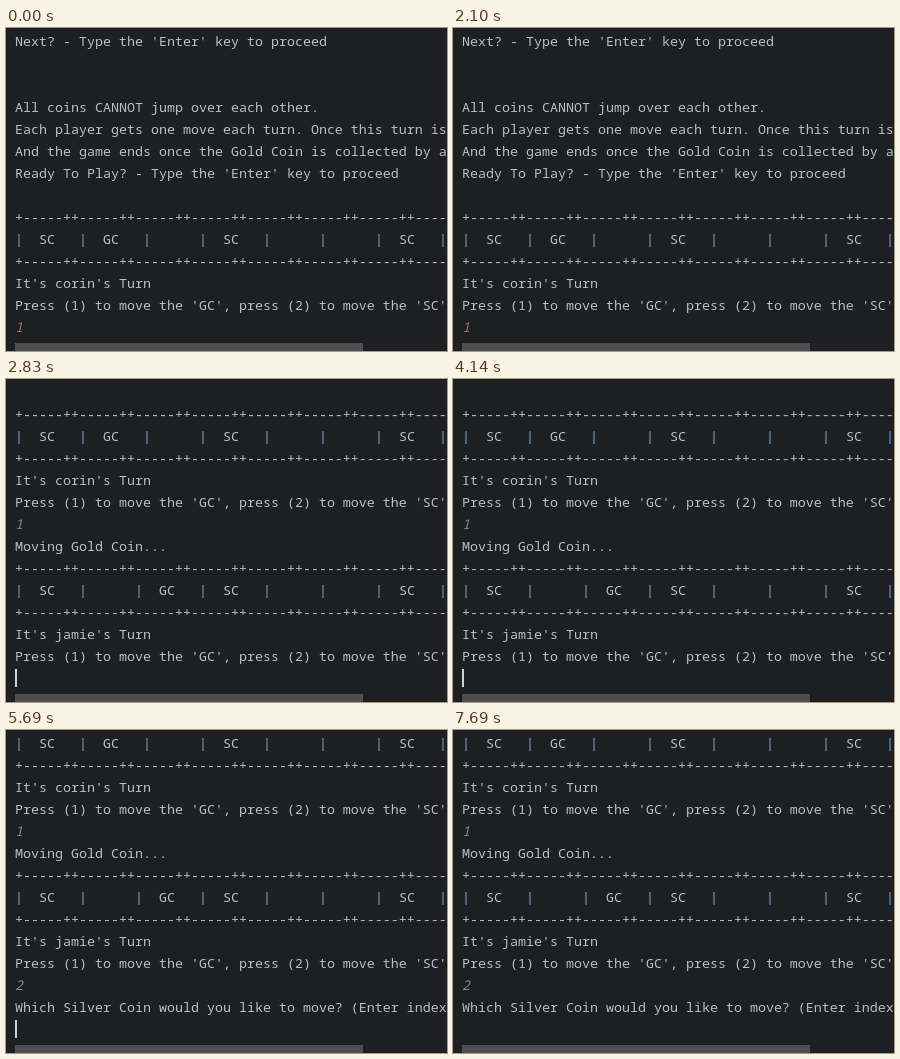
Recreate the animation shown at these times as an HTML page. Size 441x323 px, loop 8 s.

```html
<!DOCTYPE html>
<html lang="en">
<head>
<meta charset="utf-8">
<title>Coin game console</title>
<style>
  html, body { margin: 0; width: 100%; height: 100%; overflow: hidden; background: #1e1f22; }
  #stage { position: relative; width: 441px; height: 323px; overflow: hidden; }
  #log {
    position: absolute; left: 9px; top: 2px; margin: 0;
    font: 13.333px/22px "Noto Sans Mono", "DejaVu Sans Mono", monospace;
    font-variant-ligatures: none; color: #b4c0ca;
  }
  #log b { font-weight: 400; color: #78addd; }
  #log i { color: var(--typed); }
  #bar { position: absolute; left: 9px; top: 315px; width: 348px; height: 8px; background: #4d4e50; }
  #caret { position: absolute; top: 290px; width: 2px; height: 18px; background: #ced0d6; }
  #beam { position: absolute; left: -4px; top: -8px; fill: none; stroke: #d8d8d8; }
</style>
</head>
<body>
<div id="stage">
  <pre id="log"></pre>
  <div id="bar"></div>
  <div id="caret"></div>
  <svg id="beam" width="7" height="16"><path d="M0 .5H2.5L3.5 1.5L4.5 .5H7M3.5 1V15M0 15.5H2.5L3.5 14.5L4.5 15.5H7"/></svg>
</div>
<script>
const LOOP = 8000;
const $ = id => document.getElementById(id);

// A filled cell is one character wider than an empty one.
const board = cells => {
  const edge = '+-----+'.repeat(8);
  const row = cells.map(c => '<b>|</b>' + (c ? `  ${c}   ` : '      ')).join('');
  return [edge, row, edge];
};
const prompt = name => [
  `It's ${name}'s Turn`,
  "Press (1) to move the 'GC', press (2) to move the 'SC'"
];

const lines = [
  "Next? - Type the 'Enter' key to proceed", '', '',
  'All coins CANNOT jump over each other.',
  'Each player gets one move each turn. Once this turn is',
  'And the game ends once the Gold Coin is collected by a',
  "Ready To Play? - Type the 'Enter' key to proceed", '',
  ...board(['SC', 'GC', '', 'SC', '', '', 'SC', '']),
  ...prompt('corin'),
  '<i>1</i>',
  'Moving Gold Coin...',
  ...board(['SC', '', 'GC', 'SC', '', '', 'SC', '']),
  ...prompt('jamie'),
  '<i>2</i>',
  'Which Silver Coin would you like to move? (Enter index'
];

// start time, first line, end line, caret x, input colour
const views = [
  [0, 0, 14, 16, '#a2706a'],
  [2640, 2, 15, 9, '#8c8296'],
  [2830, 7, 20, 9, '#85877a'],
  [4420, 7, 21, 16, '#6aa583'],
  [5690, 9, 22, 9, '#83898c']
];

// The caret flips at each time, starting hidden.
const blinks = [550, 1080, 1550, 2100, 2640, 3640, 4140, 5150, 5690, 6690, 7150, 7690];

// start time, x, y of the text pointer
const pointer = [
  [70, 316, 315], [138, 270, 310], [206, 200, 304], [274, 150, 299],
  [342, 122, 297], [410, 149, 297], [550, 147, 293], [680, 143, 299]
];

const latest = (list, t) => list.findLast(e => e[0] <= t);
let shown;

function draw(now) {
  const t = now % LOOP;
  const view = latest(views, t);
  if (view !== shown) {
    const [, from, to, x, colour] = shown = view;
    $('log').innerHTML = lines.slice(from, to).join('\n');
    $('log').style.setProperty('--typed', colour);
    $('caret').style.left = x + 'px';
  }
  const on = blinks.filter(b => b <= t).length % 2;
  $('caret').style.visibility = on ? 'visible' : 'hidden';

  const at = t < 1630 && latest(pointer, t);
  $('beam').style.visibility = at ? 'visible' : 'hidden';
  if (at) $('beam').style.transform = `translate(${at[1]}px, ${at[2]}px)`;
  requestAnimationFrame(draw);
}
requestAnimationFrame(draw);
</script>
</body>
</html>
```
